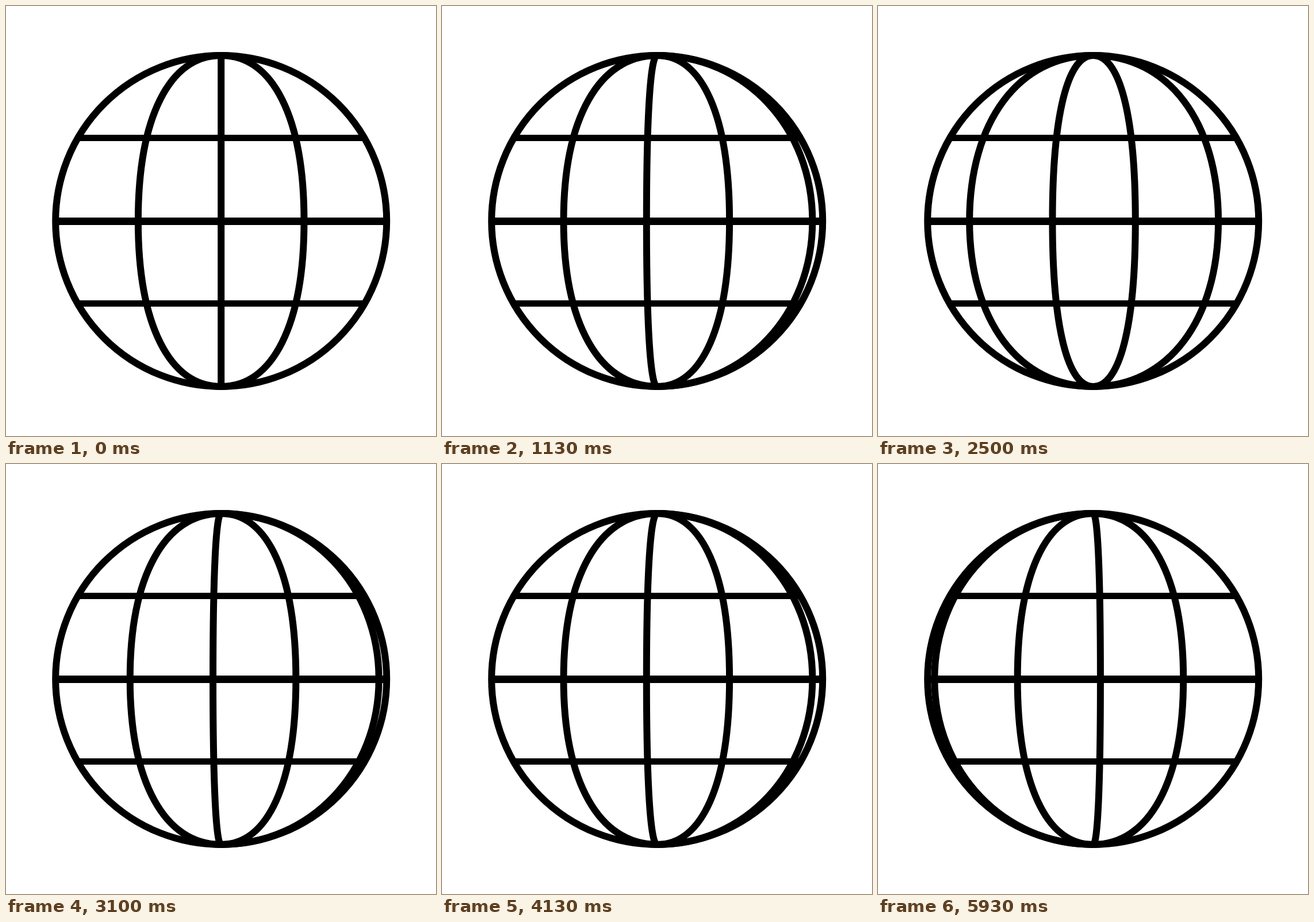
An HTML page with a canvas that plays this animation: 748x748 px, repeating every 6.01 s.

```html
<!DOCTYPE html>
<html lang="en">
<head>
<meta charset="utf-8">
<title>Turning globe</title>
<style>
  html, body { margin: 0; width: 100%; height: 100%; overflow: hidden; background: #fff; }
  canvas { display: block; width: 748px; height: 748px; }
</style>
</head>
<body>
<canvas id="stage" width="748" height="748"></canvas>
<script>
const ctx = document.getElementById('stage').getContext('2d');
const SIZE = 748, CX = 374.2, CY = 374, R = 288, LINE = 12;
const GAP = 144.3;              // distance between meridians on the equator
const LOOP = 6010;
const CYCLE = 1000, PASS = 1020; // a pass restarts just before it is complete
const ROUND = 0.5523, FULL = 0.635; // handle lengths: circle at the rim, fuller inside

// The picture steps twice every 100 ms, at 0 and 30.
function stepTime(t) {
  const rest = t % 100;
  return Math.min(t - rest + (rest >= 30 ? 30 : 0), 5930);
}

function circle(r) {
  ctx.beginPath();
  ctx.arc(CX, CY, r, 0, Math.PI * 2);
}

function meridian(dx) {
  const k = FULL + (ROUND - FULL) * Math.abs(dx / R) ** 3;
  const x = CX + dx, hx = CX + dx * k, hy = R * k;
  ctx.beginPath();
  ctx.moveTo(CX, CY - R);
  ctx.bezierCurveTo(hx, CY - R, x, CY - hy, x, CY);
  ctx.bezierCurveTo(x, CY + hy, hx, CY + R, CX, CY + R);
  ctx.stroke();
}

function parallel(y, width) {
  const half = Math.sqrt(R * R - (y - CY) ** 2);
  ctx.fillRect(CX - half, y - width / 2, half * 2, width);
}

function draw(t) {
  const shift = t % CYCLE / PASS * GAP;
  ctx.fillStyle = '#fff';
  ctx.fillRect(0, 0, SIZE, SIZE);
  ctx.fillStyle = ctx.strokeStyle = '#000';
  ctx.lineWidth = LINE;

  ctx.save();
  circle(R + LINE / 2);
  ctx.clip();
  for (let i = -2; i <= 2; i++) {
    const dx = i * GAP - shift;
    if (Math.abs(dx) < R) meridian(dx);
  }
  ctx.restore();

  parallel(229.5, 11);
  parallel(374.5, 13);
  parallel(517.5, 11);
  circle(R);
  ctx.stroke();
}

const start = performance.now();
function tick() {
  draw(stepTime((performance.now() - start) % LOOP));
  requestAnimationFrame(tick);
}
tick();
</script>
</body>
</html>
```
